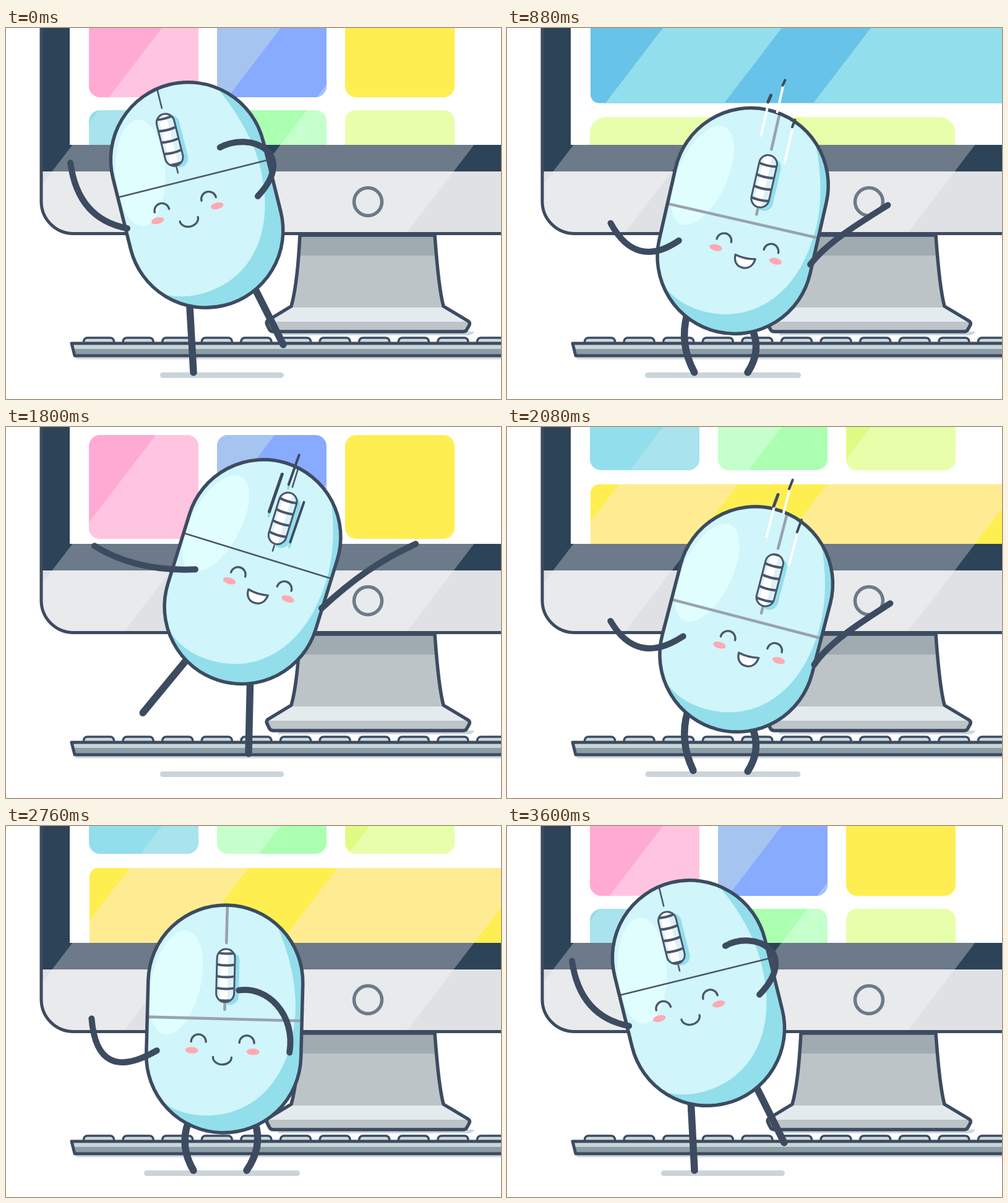
An HTML page with a canvas for the animation above (3.64 s loop, 800x600 px).

```html
<!DOCTYPE html>
<html lang="en">
<head>
<meta charset="utf-8">
<title>Dancing mouse</title>
<style>
html, body { margin: 0; width: 100%; height: 100%; overflow: hidden; background: #fff; }
canvas { display: block; }
</style>
</head>
<body>
<canvas id="stage" width="800" height="600"></canvas>
<script>
const ctx = document.getElementById('stage').getContext('2d');
const LOOP = 3640, STEP = 40;
const BEATS = [0, 1240, 2460, LOOP];   // start of each sway
const INK = '#3d4b61', LINE = '#4a566b';

const clamp = (x, lo, hi) => Math.min(hi, Math.max(lo, x));
const mix = (a, b, u) => a + (b - a) * u;
function smooth(a, b, x) {
  const u = clamp((x - a) / (b - a), 0, 1);
  return u * u * (3 - 2 * u);
}

const path = d => new Path2D(d);
function box(x, y, w, h, r = 0) {
  const b = new Path2D();
  b.roundRect(x, y, w, h, r);
  return b;
}
function oval(x, y, rx, ry, turn = 0) {
  const b = new Path2D();
  b.ellipse(x, y, rx, ry, turn, 0, Math.PI * 2);
  return b;
}
function fill(shape, color) {
  ctx.fillStyle = color;
  ctx.fill(shape);
}
function stroke(shape, color, width) {
  ctx.strokeStyle = color;
  ctx.lineWidth = width;
  ctx.stroke(shape);
}
function clipped(shape, draw) {
  ctx.save();
  ctx.clip(shape);
  draw();
  ctx.restore();
}

// Slanted reflections that stay fixed to the monitor glass.
const GLARE = [[252, 444], [588, 901]].map(([a, b]) =>
  path(`M${a},0H${b}L${b - 306},400H${a - 306}Z`));
function glossy(shape, base, light) {
  fill(shape, base);
  if (light) clipped(shape, () => GLARE.forEach(g => fill(g, light)));
}

// The scrolling page.
const PINK = ['#ffaad2', '#ffc4e0'], BLUE = ['#88aaff', '#a6c4f0'], SUN = ['#ffee52'],
  AQUA = ['#92deec', '#a8e3ee'], MINT = ['#aaffb0', '#c5ffcb'], LIME = ['#e0fb84', '#e7ffaa'],
  GOLD = ['#ffee50', '#ffec92'], SKY = ['#68c3e8', '#92deec'], CORAL = ['#ffa8ae', '#ffb0b6'], AZURE = ['#6abfe9'];
const blocks = [];
const block = (x, y, w, h, r, tone) => blocks.push({ x, y, w, h, r, tone });
const cards = (y, tones) => tones.forEach((tone, i) => block(134 + 207 * i, y, 177, 168, 18, tone));
const hero = (y, h, tone) => block(135, y, 720, h, 14, tone);
const strip = y => block(134, y, 590, 99, 25, LIME);
const pair = y => [CORAL, AZURE].forEach((tone, i) => block(135 + 414 * i, y, 379, 110, 12, tone));
for (const y of [0, 1144, 2100]) {
  pair(y - 141);
  cards(y, [PINK, BLUE, SUN]);
  cards(y + 189, [AQUA, MINT, LIME]);
  hero(y + 380, 228, GOLD);
}
hero(633, 225, SKY);
strip(881);
strip(1800);

// Each flick of the wheel throws the page up; it slows down exponentially.
const FLICK = .3905, SWIPE = 700, REST = 56;
function scrollAt(beat, p) {
  const moved = p < FLICK ? 0 : 1 - Math.exp(-11.2 * (p - FLICK));
  return REST + SWIPE * (beat + moved);
}

const CASE = path('M57,-10V280A52,52 0 0 0 109,332.5H830V-10Z');
const SCREEN = box(103, -5, 710, 194);
const NECK = path('M475,335Q471,415 461,450L423,473Q420,476 422,480L426,488Q428,491 432,491H738Q742,491 744,489L749,480Q750,476 747,474L707,450Q699,420 693,335Z');

function monitor(scroll) {
  fill(path('M440,491H757Q754,497 746,497H440Z'), '#ccd6dc');
  fill(NECK, '#bcc4c8');
  clipped(NECK, () => {
    fill(box(400, 330, 400, 38), '#a0abb1');
    fill(box(400, 452, 400, 23), '#e3ebef');
  });
  stroke(NECK, INK, 5.5);

  glossy(CASE, '#e0e1e4', '#e9eaec');
  clipped(CASE, () => glossy(box(50, -5, 760, 237), '#2c4358', '#6c7a89'));
  fill(SCREEN, '#fff');
  clipped(SCREEN, () => {
    for (const b of blocks) {
      const y = b.y - scroll;
      if (y < 189 && y + b.h > 0) glossy(box(b.x, y, b.w, b.h, b.r), ...b.tone);
    }
  });
  stroke(CASE, INK, 5);
  stroke(oval(585, 281, 22.5, 22.5), '#6c7a89', 5.5);
}

function keyboard() {
  fill(box(112, 528, 700, 8, 4), '#d9dadf');
  for (let i = 0; i < 11; i++) {
    const key = box(125.5 + 63.6 * i, 501, 49, 16, 6);
    fill(key, '#ccd9dc');
    stroke(key, INK, 3.5);
  }
  const deck = path('M106,510H830V530H111Z');
  fill(deck, '#c9d6d9');
  clipped(deck, () => fill(box(100, 519, 720, 14), '#8c9da6'));
  stroke(deck, INK, 5);
}

// Sway from left (0) to right (1) and back within one beat.
const sway = p => smooth(.05, .46, p) - smooth(.6, .99, p);

function poseAt(p) {
  const lean = sway(p), side = 2 * lean - 1;
  const stretch = smooth(0, 1, .5 + .5 * Math.cos(4 * Math.PI * (p - .488)));
  return {
    lean,
    stretch,
    squat: 1 - stretch,
    reach: smooth(0, 1, sway((p + .95) % 1)),   // hands trail the body
    jump: Math.max(0, 1 - ((p - .46) / .08) ** 2),
    turn: clamp(side * 1.5, -1, 1),
    x: 353.5 + 45 * side,
    tilt: 1.6 + 15.6 * Math.sin(side * 1.2) / Math.sin(1.2)
  };
}

const SHELL = box(-125, -184, 250, 368, 125);
const LIT = path('M75,-165C110,-95 119,-35 112,12C104,92 55,156 -28,157Q-75,157 -105,130L-200,90V-250H60Z');
const SMILE = path('M-15,35a15,12 0 0 0 30,0');
const GRIN = path('M-16,29Q0,33 17,29C16,40 10,47 0,47C-10,47 -16,40 -16,29Z');

function wheel(scroll) {
  const rim = box(-14.5, -140, 29, 86, 14.5);
  fill(box(-7, -136, 29, 86, 14.5), '#92deec');
  fill(rim, '#dcf1f6');
  clipped(rim, () => {
    fill(box(-9, -140, 13, 86), '#fff');
    const roll = ((scroll - REST) * 18 * 19 / SWIPE) % 19;
    for (let y = -134 - roll; y < -40; y += 19) stroke(path(`M-15,${y}Q0,${y + 3} 15,${y}`), LINE, 4);
  });
  stroke(rim, LINE, 3);
}

function face(open) {
  for (const side of [-1, 1]) {
    stroke(path(`M${39 * side - 12},11a12,12 0 0 1 24,0`), LINE, 3.3);
    fill(oval(49.5 * side, 25, 10.5, 5.2), '#ffa9b2');
  }
  if (open) fill(GRIN, '#fff');
  stroke(open ? GRIN : SMILE, LINE, 3.3);
}

// Speed lines shoot up beside the wheel and fade from the bottom.
function streaks(p) {
  const t = (p - .42) / .32;
  if (t < 0 || t > 1) return;
  for (const [x, from, rise, width] of [[-2, -86, 122, 5], [15, -140, 97, 4], [45, -48, 130, 4]]) {
    const top = from - rise * (1 - (1 - t) ** 8), end = from - rise * t, tail = from - rise * t / 2;
    stroke(path(`M${x},${end}V${tail}`), t < .55 ? '#92deec' : '#fff', 4);
    stroke(path(`M${x + 1},${top}L${x - 1},${end}`), INK, width);
  }
}

function body({ x, y, tilt, turn, squat }, scroll, p) {
  ctx.save();
  ctx.translate(x, y);
  ctx.rotate(tilt * Math.PI / 180);
  fill(SHELL, '#92deeb');
  clipped(SHELL, () => {
    ctx.translate(4 * turn, 0);
    fill(LIT, '#d0f5fa');
    ctx.translate(-4 * turn, 0);
    fill(oval(-80, -57, 40, 86, .2), '#e1feff');
    ctx.translate(0, 27 * squat);
    const soft = squat > .5 ? '#98a3ad' : LINE, thick = 2.6 + 2 * squat;
    stroke(path('M-130,-27H130'), soft, thick);
    ctx.translate(21 * turn, 0);
    stroke(path('M0,-230V-150M0,-54V-42'), soft, thick);
    wheel(scroll);
    ctx.translate(-turn - 2, 0);
    face(turn > 0);
  });
  stroke(SHELL, INK, 5.5);
  streaks(p);
  ctx.restore();
}

// One foot stays planted while the other kicks out.
function legs({ x, y, tilt, lean, stretch, squat, jump }) {
  const a = tilt * Math.PI / 180, c = Math.cos(a), s = Math.sin(a);
  const kickL = stretch * smooth(.3, .7, lean), kickR = stretch - kickL;
  const feet = [
    [303 - 82 * kickL, 557 - 60 * kickL - 35 * jump],
    [389 + 59 * kickR + 3 * kickL, 557 - 45 * kickR - 6 * kickL - 23 * jump]
  ];
  feet.forEach(([fx, fy], i) => {
    const side = 2 * i - 1, hip = 54 * side - 6 * kickL;
    const hx = x + hip * c - 168 * s, hy = y + hip * s + 168 * c;
    stroke(path(`M${hx},${hy}Q${(hx + fx) / 2 + 19 * side * squat},${(hy + fy) / 2} ${fx},${fy}`), INK, 11.5);
  });
}

// Arm points run from hand to shoulder; dip is their shift in the squat.
const ARMS = [
  { curve: 'Q', left: [104, 218, 116, 309, 196, 324], right: [143, 224, 212, 266, 306, 262], dip: [25, 92, 2, 123, -7, 70] },
  { curve: 'C', left: [345, 193, 395, 166, 472, 202, 407, 272], right: [664, 221, 608, 246, 560, 279, 510, 325], dip: [-45, 66, -30, 71, -35, 75, 0, 68] }
];
function arm({ curve, left, right, dip }, { lean, reach, squat, jump }) {
  const last = left.length / 2 - 1;
  const pts = left.map((v, i) => {
    const along = (Math.floor(i / 2) / last) ** 2;
    return mix(v, right[i], mix(reach, lean, along)) + dip[i] * squat - (i % 2) * 32 * jump;
  });
  stroke(path(`M${pts.slice(0, 2)}${curve}${pts.slice(2)}`), INK, 10);
}

function draw(t) {
  let beat = 0;
  while (t >= BEATS[beat + 1]) beat++;
  const p = (t - BEATS[beat]) / (BEATS[beat + 1] - BEATS[beat]);
  const scroll = scrollAt(beat, p), pose = poseAt(p);
  pose.y = 270 + 42 * pose.squat - 36 * pose.jump;
  const half = 100 + 26 * pose.squat;

  ctx.fillStyle = '#fff';
  ctx.fillRect(0, 0, 800, 600);
  ctx.lineCap = ctx.lineJoin = 'round';
  monitor(scroll);
  keyboard();
  stroke(path(`M${353.5 - half},561.5H${344.5 + half}`), '#cbd5d9', 9);
  legs(pose);
  body(pose, scroll, p);
  ARMS.forEach(a => arm(a, pose));
}

let start;
function tick(now) {
  start ??= now;
  draw(Math.floor((now - start) % LOOP / STEP) * STEP);
  requestAnimationFrame(tick);
}
draw(0);
requestAnimationFrame(tick);
</script>
</body>
</html>
```
